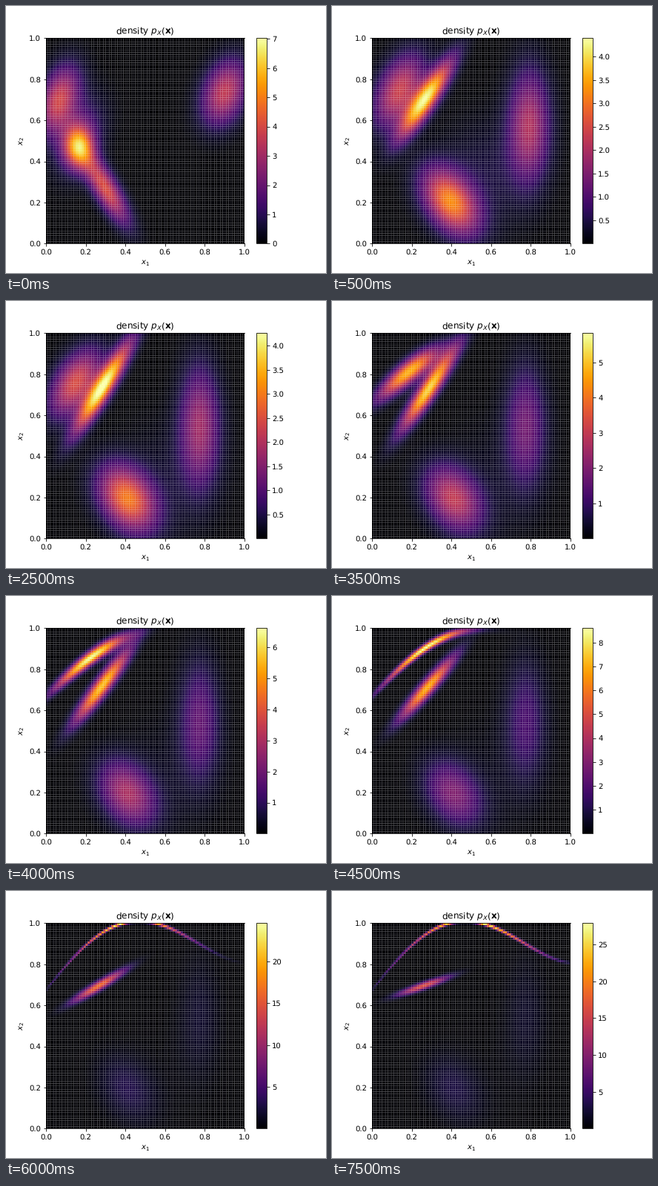
Animation of 432 by 360 pixels, one loop 8 s. Source, as a matplotlib script:

```python
import numpy as np
import matplotlib.pyplot as plt
from matplotlib.animation import FuncAnimation

CELLS = 100
FRAMES = 16
STEP_MS = 500

plt.rcParams["text.hinting"] = "none"

edges = np.linspace(0, 1, CELLS + 1)
mid = (edges[:-1] + edges[1:]) / 2
X, Y = np.meshgrid(mid, mid)

# Upper end of the colour scale: seconds, value
TOP_T = [0, .5, 1.5, 2.5, 4, 5, 5.5, 6, 7.5]
TOP_V = [7.03, 4.4, 4.085, 4.258, 6.62, 10.6, 18.5, 24.6, 27.9]

# Curve the upper blob collapses onto
ARC_X = [0, .116, .209, .284, .358, .48, .6, .638, .777, .918, .993]
ARC_Y = [.672, .813, .896, .95, .99, 1.01, .993, .968, .888, .835, .805]
ARC = np.polyval(np.polyfit(ARC_X, ARC_Y, 5), X)


def mix(a, b, k):
    return a + (b - a) * k


def geo(a, b, k):
    return a * (b / a) ** k


def smooth(t, start, end):
    k = np.clip((t - start) / (end - start), 0, 1)
    return k * k * (3 - 2 * k)


def ridge(peak, x0, y_mean, sx, sy):
    """Gaussian in x, and in y around the curve y_mean(x)."""
    return peak * np.exp(-((X - x0) / sx) ** 2 / 2 - ((Y - y_mean) / sy) ** 2 / 2)


def settling(start, end, k):
    peak, x0, y0, slope, sx, sy = mix(np.array(start), np.array(end), k)
    return ridge(peak, x0, y0 + slope * (X - x0), sx, sy)


def density(t, top):
    settle = 1 - np.exp(-4 * t)
    turn = smooth(t, 2.5, 7.5)
    rise = smooth(t, 2, 6)

    # upper left: thins out and bends into the arc
    x0 = mix(mix(.065, .15, settle), .5, turn)
    y0 = mix(mix(.70, .75, settle), .85, rise)
    sx = mix(mix(.072, .09, settle), .24, turn)
    sy = geo(mix(.105, .11, settle), .0055, rise)
    line = mix(y0 + .6 * (X - x0), ARC, rise)
    z = ridge(top * min(1, .54 + .9 * rise), x0, line, sx, sy)

    # long ridge: flattens and narrows
    x0 = mix(mix(.165, .29, settle), .26, turn)
    y0 = mix(mix(.47, .745, settle), .695, rise)
    slope = mix(1.41 * settle, .33, turn)
    sx = mix(mix(.052, .097, settle), .09, turn)
    sy = geo(mix(.072, .06, settle), .013, turn)
    peak = top * mix(mix(.65, .93, settle), .6, turn)
    z += ridge(peak, x0, y0 + slope * (X - x0), sx, sy)

    # lower, right and faint background blobs
    z += settling((4.1, .30, .27, -1.17, .08, .072), (2.9, .41, .195, -.35, .10, .105), settle)
    z += settling((3.6, .90, .735, .4, .08, .105), (1.75, .775, .55, 0, .07, .20), settle)
    z += settling((1.5, .17, .53, .5, .09, .12), (.25, .62, .30, 0, .18, .20), settle)
    return z


fig = plt.figure(figsize=(6, 5), dpi=72)
ax = fig.add_axes([.125, .11, .62, .77])
cax = fig.add_axes([338.4 / 432, .11, 13.86 / 432, .77])
ax.spines.right.set_position(("outward", -.4))

# Smoothed cell borders leave the fine pale grid
mesh = ax.pcolor(edges, edges, density(0, TOP_V[0]), cmap="inferno",
                 vmin=0, vmax=TOP_V[0], antialiased=True, snap=False)
ax.set(xlim=(0, 1), ylim=(0, 1), xlabel="$x_1$", ylabel="$x_2$",
       title=r"density $p_X(\mathbf{x})$")
fig.colorbar(mesh, cax=cax)


def update(i):
    t = i * STEP_MS / 1000
    top = np.interp(t, TOP_T, TOP_V)
    mesh.set_array(density(t, top))
    mesh.set_clim(.002 if i else 0, top)
    return [mesh]


anim = FuncAnimation(fig, update, frames=FRAMES, interval=STEP_MS, repeat=True)
plt.show()
```
